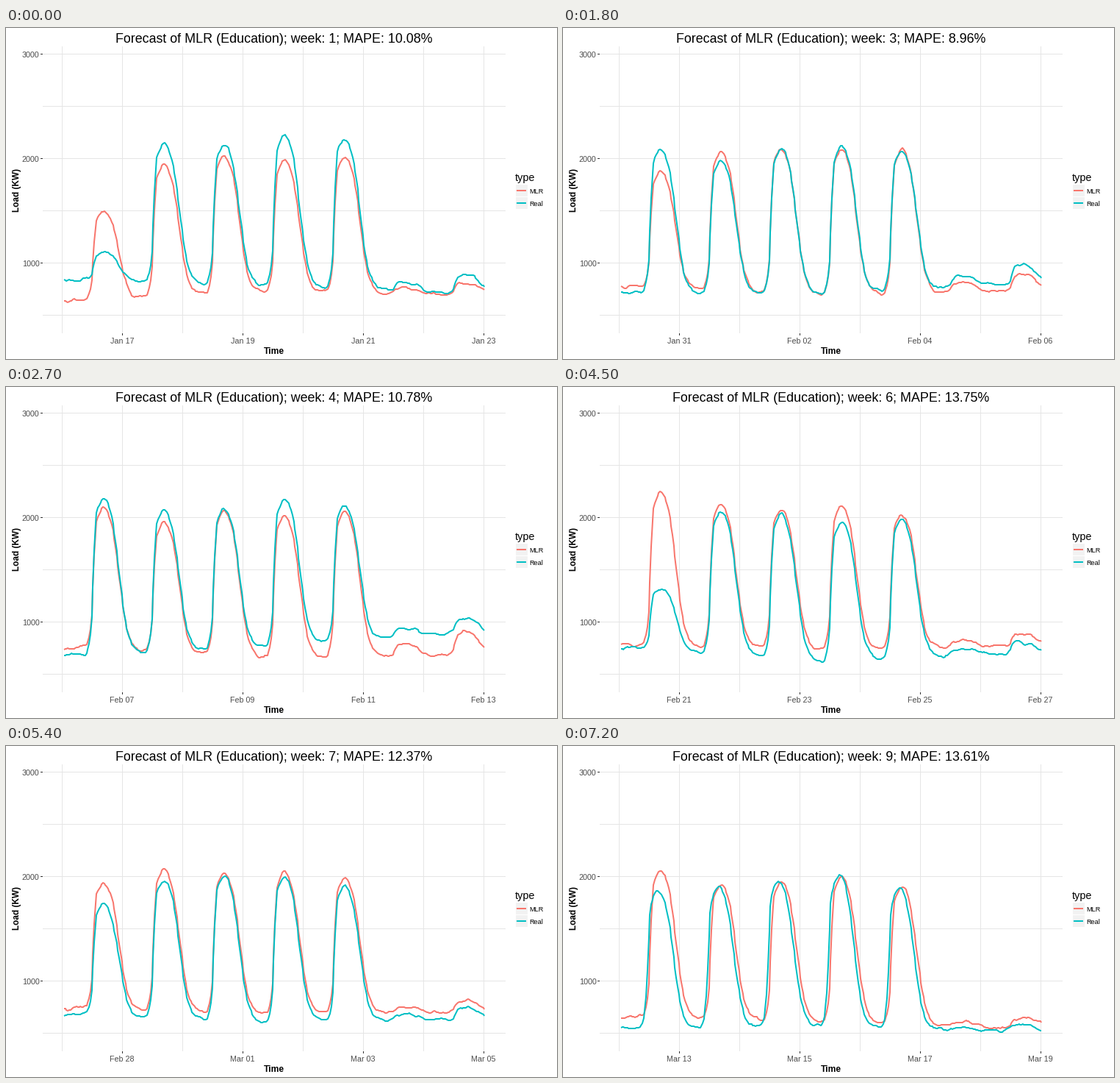
A matplotlib script for the animation above (8000 ms loop, 750 by 450 pixels).

```python
import numpy as np
import matplotlib.pyplot as plt
from matplotlib.animation import FuncAnimation
from matplotlib.patches import Rectangle

W, H, DPI = 750, 450, 100
MLR, REAL = "#F8766D", "#00BFC4"
GRID, TICK, GREY = "#E5E5E5", "#333333", "#4D4D4D"
DAY, LEFT = 82, 76
STEP_MS, HOLD, FRAMES = 100, 9, 80
MONTHS = ("Jan", "Feb", "Mar")
SUMMER_TIME = 9  # measured load runs an hour early from this week on

# Night load at start, middle and weekend; five daily peaks; weekend lift
WEEKS = {
    1: ([640, 720, 700, 1480, 1920, 2010, 1960, 1995, 110],
        [840, 780, 715, 1100, 2125, 2115, 2205, 2165, 170]),
    2: ([780, 740, 770, 1620, 2130, 2095, 2125, 2085, 130],
        [750, 630, 710, 2000, 1870, 2085, 2030, 2010, 230]),
    4: ([760, 650, 680, 2070, 1945, 2040, 2000, 2040, 220],
        [690, 760, 880, 2155, 2050, 2060, 2150, 2090, 150]),
    6: ([780, 730, 770, 2210, 2100, 2060, 2090, 2000, 120],
        [750, 620, 690, 1310, 2040, 2010, 1935, 1960, 120]),
    8: ([710, 630, 630, 1630, 1985, 1960, 1960, 1935, 100],
        [610, 580, 565, 2115, 1860, 1940, 1975, 1785, 110]),
    9: ([650, 610, 555, 2030, 1900, 1935, 1975, 1880, 90],
        [550, 560, 520, 1840, 1880, 1930, 1985, 1860, 60]),
}
for n in (3, 5, 7):
    WEEKS[n] = np.add(WEEKS[n - 1], WEEKS[n + 1]) / 2
ERRORS = (10.08, 8.45, 8.96, 10.78, 7.94, 13.75, 12.37, 8.71, 13.61)

times = LEFT + 3 + DAY / 48 * np.arange(336)


def load_y(kw):
    return 319.5 - (np.asarray(kw) - 1000) * 0.1418


def ramp(t, centre, width):
    """Smooth step from 0 to 1."""
    return (1 + np.tanh((t - centre) / (2 * width))) / 2


def day_shape(t):
    """Share of the daily peak, t pixels after midnight."""
    rise = .12 * ramp(t, 37.5, 1.7) + .76 * ramp(t, 43, 1.4) + .12 * ramp(t, 52, 2.5)
    return rise * ramp(-t, -78, 6) / .94


def curve(params, seed, early=0):
    nights, peaks, lift = params[:3], params[3:8], params[8]
    t = times - LEFT + early
    night = np.interp(t, DAY * np.array([.3, 3.3, 6.2]), nights)
    kw = night.copy()
    for d, peak in enumerate(peaks):
        kw += (peak - night) * day_shape(t - DAY * d)
    kw += lift * (.5 * day_shape(t - DAY * 5) + day_shape(t - DAY * 6))

    rng = np.random.default_rng(seed)
    steps = np.repeat(rng.normal(0, 14, 170), 2)
    kw += np.convolve(steps, np.full(5, .2), "valid")[:t.size]
    return np.round(load_y(kw))


curves = {n: (curve(mlr, 2 * n), curve(real, 2 * n + 1, DAY / 24 * (n >= SUMMER_TIME)))
          for n, (mlr, real) in WEEKS.items()}


def px(size):
    return size * 72 / DPI


def day_label(week, day):
    date = np.datetime64("2012-01-16") + 7 * (week - 1) + day
    _, month, dom = str(date).split("-")
    return f"{MONTHS[int(month) - 1]} {dom}"


plt.rcParams["font.family"] = "Liberation Sans"
fig = plt.figure(figsize=(W / DPI, H / DPI), dpi=DPI, facecolor="white")
ax = fig.add_axes([0, 0, 1, 1])
ax.set_xlim(0, W)
ax.set_ylim(H, 0)
ax.axis("off")


def rule(x, y, color, width=1, z=1):
    return ax.plot(x, y, color=color, lw=px(width), snap=False, zorder=z,
                   solid_capstyle="butt", solid_joinstyle="round")[0]


def label(x, y, text, size, color="black", ha="center", va="baseline", **kw):
    return ax.text(x, y, text, fontsize=px(size), color=color, ha=ha, va=va, **kw)


for kw in range(500, 3001, 500):
    y = np.floor(load_y(kw)) + .5
    rule([50, 680], [y, y], GRID)
    if kw % 1000 == 0:
        rule([47, 50], [y, y], TICK)
        label(45.5, y + 4, str(kw), 10.8, GREY, "right")

dates = []
for d in range(8):
    x = LEFT + DAY * d + .5
    rule([x, x], [25, 415], GRID)
    if d % 2:
        rule([x, x], [415, 418], TICK)
        dates.append((d, label(x - .5, 429, "", 10.8, GREY)))

label(365, 443, "Time", 12, weight="bold")
label(15, 220.5, "Load (KW)", 11.7, weight="bold", rotation=90, va="center")
title = label(364.5, 20, "", 17.9)

label(692.5, 208, "type", 14.4, ha="left")
for y, name, color in ((221, "MLR", MLR), (238, "Real", REAL)):
    ax.add_patch(Rectangle((694, y - 8), 16, 16, fc="#F2F2F2", ec="none"))
    rule([695, 708], [y, y], color, 2)
    label(712, y + 4, name, 9.1, ha="left")

lines = [rule(np.round(times), times, c, 2, z) for c, z in ((MLR, 3), (REAL, 4))]


def draw(frame):
    week = min(frame // HOLD, 8) + 1
    title.set_text(f"Forecast of MLR (Education); week: {week}; "
                   f"MAPE: {ERRORS[week - 1]:.2f}%")
    for day, text in dates:
        text.set_text(day_label(week, day))
    for line, ys in zip(lines, curves[week]):
        line.set_ydata(ys)
    return [title, *lines, *(t for _, t in dates)]


anim = FuncAnimation(fig, draw, frames=FRAMES, interval=STEP_MS,
                     repeat=True, repeat_delay=0, blit=False)
plt.show()
```
